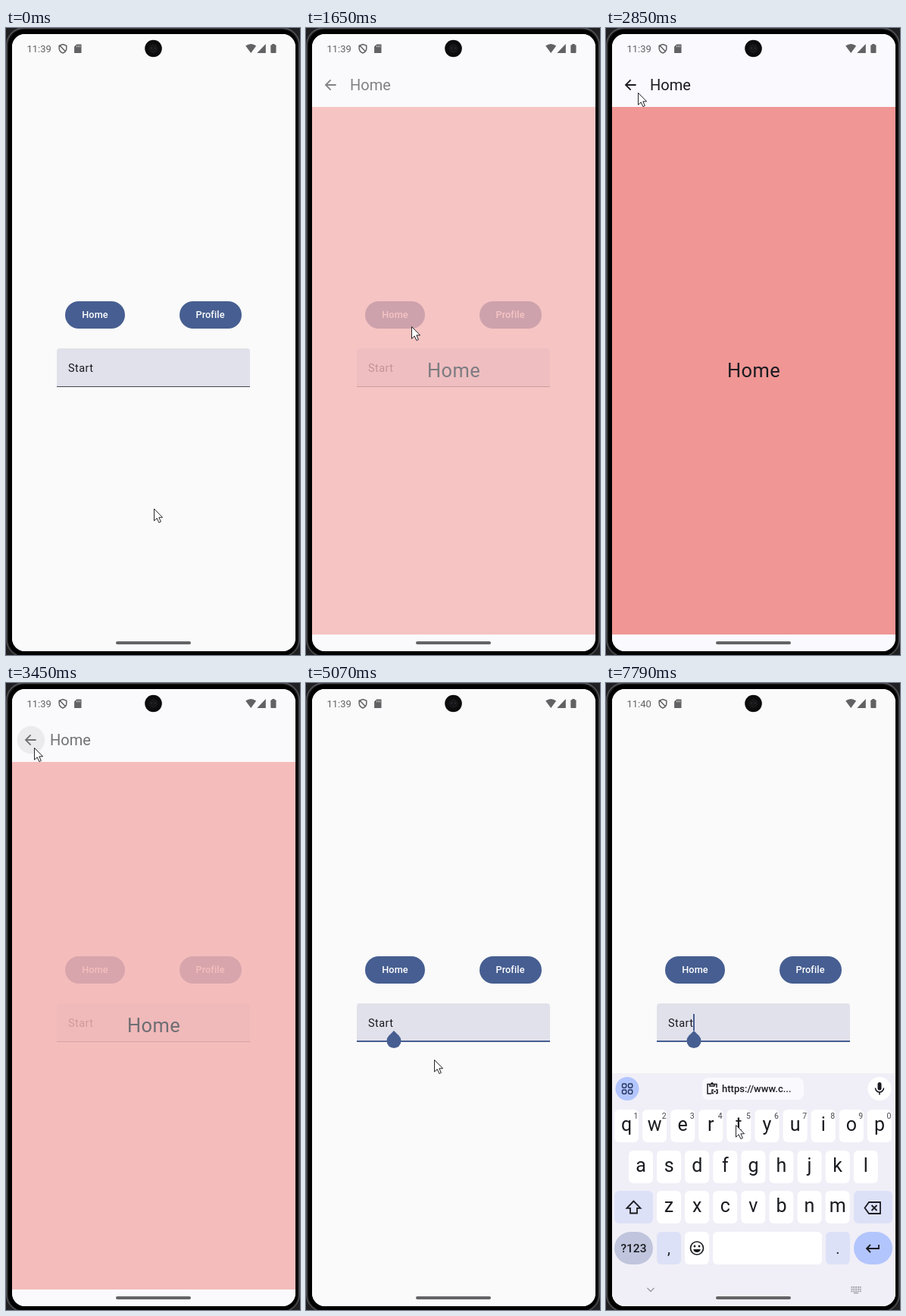
These frames come from a looping animation (388 px wide and 826 px high, 8 s). An HTML page with a canvas:

```html
<!DOCTYPE html>
<html lang="en">
<head>
<meta charset="utf-8">
<title>Screen navigation</title>
<style>
html, body { margin: 0; width: 100%; height: 100%; overflow: hidden; background: #000; }
canvas { display: block; }
</style>
</head>
<body>
<canvas id="stage" width="388" height="826"></canvas>
<script>
const W = 388, H = 826, LOOP = 8000;
const BLUE = '#465e91', INK = '#1a1b20', GREY = '#626264', PAGE = '#faf9fe';
const KEY_TINT = '#dde1f8', ACCENT = '#b3c5fd';
const stage = document.getElementById('stage').getContext('2d');
const layer = document.createElement('canvas');
layer.width = W;
layer.height = H;
const layerCtx = layer.getContext('2d');
let g = stage;

// Pointer path: time, x, y
const POINTER = [
  [0, 195, 633], [70, 195, 633], [200, 199, 600], [450, 190, 520], [700, 166, 440],
  [850, 154, 413], [910, 154, 413], [1150, 139, 393], [1760, 139, 393],
  [2200, 168, 330], [2350, 171, 300], [2550, 152, 250], [2700, 105, 150],
  [2830, 42, 85], [2950, 42, 85], [3100, 37, 85], [3500, 37, 85],
  [3700, 110, 280], [3950, 190, 457], [4110, 188, 460], [4300, 189, 461],
  [4870, 187, 461], [5330, 145, 541], [5450, 145, 542], [5480, 147, 546],
  [5660, 147, 546], [5800, 150, 526], [5930, 150, 525], [6120, 150, 525],
  [6270, 158, 486], [6450, 160, 482], [6600, 160, 482], [6990, 166, 525],
  [7130, 167, 535], [7600, 172, 580], [7780, 171, 582], [8000, 171, 582]
];

const clamp = v => Math.max(0, Math.min(1, v));
const mix = (a, b, p) => a + (b - a) * p;
const span = (t, from, length) => clamp((t - from) / length);

// Material standard easing, cubic-bezier(.4, 0, .2, 1)
function ease(x) {
  let lo = 0, hi = 1;
  for (let i = 0; i < 24; i++) {
    const s = (lo + hi) / 2, r = 1 - s;
    if (1.2 * r * r * s + 0.6 * r * s * s + s * s * s < x) lo = s; else hi = s;
  }
  return 3 * (1 - lo) * lo * lo + lo * lo * lo;
}

function box(x, y, w, h, r, color) {
  g.fillStyle = color;
  g.beginPath();
  g.roundRect(x, y, w, h, r);
  g.fill();
}

function disc(x, y, r, color) {
  g.fillStyle = color;
  g.beginPath();
  g.arc(x, y, r, 0, 7);
  g.fill();
}

function shape(d, color, x = 0, y = 0) {
  g.save();
  g.translate(x, y);
  g.fillStyle = color;
  g.fill(new Path2D(d));
  g.restore();
}

function stroke(d, color, width, x = 0, y = 0) {
  g.save();
  g.translate(x, y);
  g.strokeStyle = color;
  g.lineWidth = width;
  g.stroke(new Path2D(d));
  g.restore();
}

function label(str, x, y, size, color, align = 'left', weight = 400, spacing = 0) {
  g.font = `${weight} ${size}px Roboto, sans-serif`;
  g.letterSpacing = spacing + 'px';
  g.textAlign = align;
  g.fillStyle = color;
  g.fillText(str, x, y);
}

// Draws a group off screen, then lays it down with one opacity
function group(alpha, draw) {
  if (alpha <= 0) return;
  layerCtx.clearRect(0, 0, W, H);
  g = layerCtx;
  draw();
  g = stage;
  g.globalAlpha = alpha;
  g.drawImage(layer, 0, 0);
  g.globalAlpha = 1;
}

function startPage(t) {
  box(0, 0, W, H, 0, '#fafafa');
  box(78, 360, 79, 36, 18, BLUE);
  label('Home', 117.5, 382.3, 12.7, '#fff', 'center', 500, 0.1);
  box(229, 360, 82, 36, 18, BLUE);
  label('Profile', 269.5, 382.3, 12.7, '#fff', 'center', 500, 0.1);

  const focused = t >= 4870;
  box(67, 422, 255, 51, [4, 4, 0, 0], '#e1e1eb');
  if (focused) box(67, 471, 255, 2, 0, BLUE);
  else box(67, 472, 255, 1, 0, '#44464f');
  label('Start', 82, 452.5, 14.5, INK, 'left', 400, 0.45);
  const caretOn = t >= 4290 && Math.floor((t - 4290) / 500) % 2 === 0;
  if (caretOn || t >= 7290) box(115, 436, 2, 22, 0, BLUE);
  if (focused) {
    disc(116, 471.5, 9.5, BLUE);
    shape('M0 -13.4 L6.7 -6.7 L0 0 L-6.7 -6.7 Z', BLUE, 116, 471.5);
  }
}

function homePage(t) {
  box(0, 0, W, H, 0, PAGE);
  box(8, 104, 374, 695, 0, '#f09694');
  const press = span(t, 3200, 150);
  if (press > 0) disc(33, 75, mix(8, 18.2, press), 'rgba(0,0,0,.1)');
  stroke('M7 -6.6 L.4 0 L7 6.6 M.4 0 H14', INK, 1.8, 25.6, 75);
  label('Home', 58, 81.8, 20, INK);
  label('Home', 195, 460, 25.4, INK, 'center', 400, 0.45);
}

function keyCap(x, y, w, color = '#fff') {
  box(x, y, w, 43, 6, color);
}

function letterRow(letters, firstX, y, digits) {
  [...letters].forEach((c, i) => {
    const x = firstX + i * 37.1;
    keyCap(x - 16, y, 32);
    label(c, x, y + 28, 25, INK, 'center');
    if (digits) label((i + 1) % 10, x + 12.5, y + 11.5, 10.5, '#44464f', 'center');
  });
}

function suggestionBar() {
  disc(28, 534.5, 15.5, ACCENT);
  for (const x of [21.5, 29.5])
    for (const y of [528, 536]) {
      g.strokeStyle = '#26365f';
      g.lineWidth = 1.5;
      g.beginPath();
      g.roundRect(x, y, 5.2, 5.2, 1.4);
      g.stroke();
    }
  box(127, 520, 134, 29, 8, '#faf9fe');
  stroke('M-1 7 H-6 V-5.5 H6 V-1 M-3 -5.5 V-3 H3 V-5.5 M2 2 H0 V6.5 H2 M5 2 H7 V6.5 H5 M2 4.2 H5', INK, 1.5, 140, 534);
  disc(140, 527.5, 1.6, INK);
  label('https://www.c...', 153, 539.3, 13, INK, 'left', 500);
  disc(361, 534.5, 15.5, '#fff');
  box(358.5, 526, 5, 10.5, 2.5, INK);
  stroke('M-5.5 -1 A5.5 5.5 0 0 0 5.5 -1 M0 4.5 V8', INK, 1.6, 361, 534.5);
}

function keyboard(t) {
  const rise = ease(span(t, 6580, 400));
  if (rise === 0) return;
  g.save();
  g.translate(0, mix(312, 0, rise));
  box(8, 514, 374, 312, 0, '#f0eff7');
  suggestionBar();
  letterRow('qwertyuiop', 27, 562, true);
  letterRow('asdfghjkl', 46, 616);
  letterRow('zxcvbnm', 83, 669);

  keyCap(11, 669, 51, KEY_TINT);
  stroke('M0 -8.5 L-9 .8 H-4.5 V7.5 H4.5 V.8 H9 Z', INK, 1.8, 36.5, 691);
  keyCap(327, 669, 51, KEY_TINT);
  stroke('M-10.5 0 L-5 -7.5 H10 V7.5 H-5 Z M-1.5 -3.5 L5.5 3.5 M5.5 -3.5 L-1.5 3.5', INK, 1.8, 352, 691.5);

  box(11, 723, 51, 43, 21.5, '#c0c5dd');
  label('?123', 36.5, 749.5, 15.5, INK, 'center', 500);
  keyCap(67, 723, 32, KEY_TINT);
  label(',', 83, 752, 20, INK, 'center');
  keyCap(104, 723, 32);
  stroke('M8.5 0 A8.5 8.5 0 1 1 -8.5 0 A8.5 8.5 0 1 1 8.5 0', INK, 1.7, 120, 744.5);
  disc(117, 742, 1.4, INK);
  disc(123, 742, 1.4, INK);
  shape('M-4.8 1.5 H4.8 A4.9 4.9 0 0 1 -4.8 1.5', INK, 120, 744.5);
  keyCap(141, 723, 144);
  keyCap(290, 723, 32, KEY_TINT);
  label('.', 306, 752, 20, INK, 'center');
  box(327, 723, 51, 43, 21.5, ACCENT);
  stroke('M8 -5 V0 H-8 M-3 -5 L-8 0 L-3 5', INK, 1.8, 352, 745);
  g.restore();

  g.globalAlpha = span(t, 7100, 120);
  stroke('M-4.5 -2 L0 2.5 L4.5 -2', '#9a9aa1', 1.4, 59, 799);
  for (let row = 0; row < 3; row++)
    for (let col = 0; col < 5; col++)
      box(323.5 + col * 2.8, 795 + row * 2.7, 1.9, 1.8, 0, '#9a9aa1');
  box(327, 803, 6, 1.2, 0, '#9a9aa1');
  g.globalAlpha = 1;
}

function statusBar(t) {
  label(t < 6330 ? '11:39' : '11:40', 27.5, 31.8, 13, GREY);
  stroke('M0 -5.5 L4.8 -3.7 V0 C4.8 3 2.5 5 0 6 C-2.5 5 -4.8 3 -4.8 0 V-3.7 Z M-4 -4 L3.5 4', GREY, 1.5, 75, 27);
  shape('M-1.5 -5.8 H4.7 V5.8 H-4.7 V-2.6 Z', GREY, 94.8, 27.2);
  for (let i = 0; i < 3; i++) box(93 + i * 2, 23.3, 1, 2, 0, '#d0d0d0');
  shape('M-7 -3.4 Q0 -8.6 7 -3.4 L0 6 Z', GREY, 323.2, 27);
  shape('M-5.7 6 L5.8 -6 V6 Z', GREY, 337, 27);
  box(349.3, 22.3, 7.2, 10.8, 1, GREY);
  box(351.2, 21, 3.4, 2, 0, GREY);
  disc(194.5, 27, 11.3, '#0c0c0d');
  disc(194.5, 27, 6, '#171719');
  disc(192, 26.5, 0.8, '#38383c');
  disc(197, 26.5, 0.8, '#38383c');
  box(145, 808, 99, 4, 2, '#646466');
}

function pointer(t) {
  const i = Math.max(1, POINTER.findIndex(k => k[0] >= t));
  const [t0, x0, y0] = POINTER[i - 1], [t1, x1, y1] = POINTER[i];
  const p = span(t, t0, t1 - t0);
  const x = Math.round(mix(x0, x1, p)), y = Math.round(mix(y0, y1, p));
  const arrow = 'M.5 .5 V16.2 L4.2 12.8 L6.9 18.6 L9.4 17.4 L6.8 11.8 H11.6 Z';
  shape(arrow, '#fff', x, y);
  stroke(arrow, '#26262a', 1, x, y);
}

function bezel() {
  box(0, 0, W, H, 0, '#202022');
  box(0, -1, W, H + 4, 24, '#55565a');
  box(1.5, 0.8, W - 3, H + 1, 22, '#1c1c1e');
  box(3, 2, W - 6, H - 1, 21, '#000');
}

function draw(t) {
  bezel();
  g.save();
  g.beginPath();
  g.roundRect(8, 8, 374, 813, 17);
  g.clip();
  box(0, 0, W, H, 0, '#fafafb');
  const home = t < 3000 ? ease(span(t, 1395, 700)) : 1 - ease(span(t, 3235, 700));
  group(1 - home, () => startPage(t));
  group(home, () => homePage(t));
  keyboard(t);
  statusBar(t);
  g.restore();
  pointer(t);
}

function tick() {
  draw(performance.now() % LOOP);
  requestAnimationFrame(tick);
}
tick();
</script>
</body>
</html>
```
